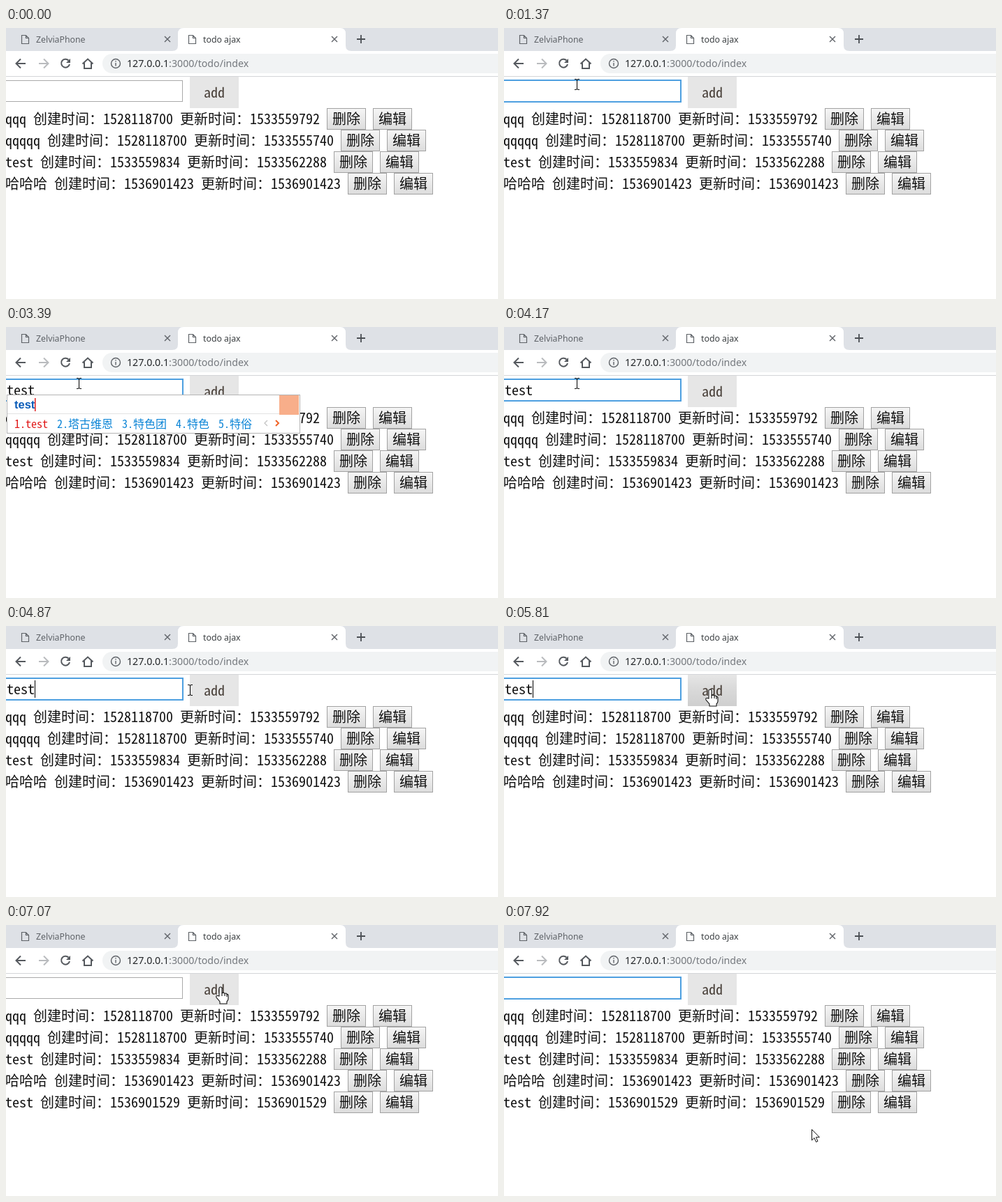
Write an HTML page with a canvas that moves like this. It is 704x389 px and loops after 8000 ms.

```html
<!DOCTYPE html>
<html lang="zh-CN">
<head>
<meta charset="utf-8">
<style>
html, body { margin: 0; width: 100%; height: 100%; overflow: hidden; background: #fff; }
canvas { display: block; }
</style>
</head>
<body>
<canvas id="stage" width="704" height="389"></canvas>
<script>
const c = document.getElementById('stage').getContext('2d');
const LOOP = 8000;
const MONO = '"Noto Sans Mono CJK SC", "Noto Sans CJK SC", monospace';
const UI = '"Noto Sans", "Open Sans", sans-serif';

const todos = [
  ['qqq', 1528118700, 1533559792],
  ['qqqqq', 1528118700, 1533555740],
  ['test', 1533559834, 1533562288],
  ['哈哈哈', 1536901423, 1536901423],
  ['test', 1536901529, 1536901529]
];
const typed = [[0, ''], [1830, 't'], [2310, 'te'], [2610, 'tes'], [2850, 'test'], [7070, '']];
const candidates = {
  t: '他 她 它 听 图',
  te: '特 忒 忑 慝 铽',
  tes: '特色 特俗 特赦 特设 特',
  test: 'test 塔古维恩 特色团 特色 特俗'
};
const caretOn = [[810, 1370], [1830, 3390], [3630, 4170], [4650, 5190], [5730, 6270]];
const pointer = [
  [0, null], [110, arrow, 548, 372], [190, arrow, 430, 290], [270, arrow, 310, 210],
  [350, arrow, 190, 140], [430, beam, 110, 100], [510, beam, 72, 88], [590, beam, 104, 88],
  [970, beam, 104, 84], [1050, beam, 104, 81], [4330, beam, 150, 79], [4410, beam, 215, 77],
  [4490, beam, 259, 77], [4730, beam, 260, 86], [4870, beam, 263, 92], [4970, hand, 285, 91],
  [5810, hand, 295, 92], [5890, hand, 306, 92], [5970, hand, 316, 92], [6050, hand, 322, 91],
  [6130, hand, 327, 91], [6210, hand, 320, 91], [6370, hand, 312, 90], [6450, hand, 307, 90],
  [7840, arrow, 400, 240], [7920, arrow, 440, 293]
];

const at = (list, t) => list.filter(k => k[0] <= t).pop();
const within = (t, a, b) => t >= a && t < b;

function rect(x, y, w, h, fill) {
  c.fillStyle = fill;
  c.fillRect(x, y, w, h);
}
function text(s, x, y, font, fill) {
  c.font = font;
  c.fillStyle = fill;
  c.fillText(s, x, y);
}
function path(d, stroke, width, fill, x = 0, y = 0) {
  const p = new Path2D(d);
  c.save();
  c.translate(x, y);
  if (fill) { c.fillStyle = fill; c.fill(p); }
  if (stroke) { c.strokeStyle = stroke; c.lineWidth = width; c.stroke(p); }
  c.restore();
}
function frame(x, y, w, h, stroke, width = 1) {
  c.strokeStyle = stroke;
  c.lineWidth = width;
  c.strokeRect(x, y, w, h);
}
function gradient(y, h, ...stops) {
  const g = c.createLinearGradient(0, y, 0, y + h);
  stops.forEach(([pos, color]) => g.addColorStop(pos, color));
  return g;
}

function arrow(x, y) {
  path('M.5 .5V16L4 12.6 6.6 18.5 9 17.4 6.5 11.7H11.4Z', '#111', 1, '#fff', x, y);
}
function beam(x, y) {
  path('M-3 -7.5H-1Q.5 -7.5 .5 -6V6Q.5 7.5 -1 7.5H-3M4 -7.5H2Q.5 -7.5 .5 -6M.5 6Q.5 7.5 2 7.5H4', '#000', 1, null, x, y);
}
function hand(x, y) {
  path('M-2 12V1Q-2 -1 0 -1T2 1V8Q4 6 6 8.5 8 7 9 9.5 11 9 11 11.5V16Q11 18 9 20V23H-1V20L-6 14Q-7 11 -4 11.5Z'
    + 'M2 8V12M6 9V12M9 10V13', '#111', 1.1, '#fff', x, y);
}

function tabLabel(x, label, color) {
  path('M.5 .5H6.5L10.5 4.5V12.5H.5ZM6.5 .5V4.5H10.5', '#5f6368', 1.2, null, x, 10);
  text(label, x + 21, 21, '12.3px ' + UI, color);
  path('M-4 -4L4 4M4 -4L-4 4', '#5f6368', 1.4, null, x + 209, 16);
}

function browser() {
  rect(0, 0, 704, 33, '#dee1e6');
  path('M238 33Q246 33 246 25V8Q246 0 254 0H478Q486 0 486 8V25Q486 33 494 33Z', null, 0, '#fff');
  tabLabel(22, 'ZelviaPhone', '#5f6368');
  tabLabel(261, 'todo ajax', '#3c4043');
  path('M502 16H514M508 10V22', '#4b4f54', 1.8);

  path('M28 51H15M21 44.5L14.5 51 21 57.5', '#55595e', 2);
  path('M47 51H60M54 44.5L60.5 51 54 57.5', '#b9bbbe', 2);
  path('M89.5 46.5A6 6 0 1 0 91 52', '#55595e', 2);
  path('M92 44V50H86Z', null, 0, '#55595e');
  path('M109.5 51.5L117 44.5 124.5 51.5M112 50V58H122V50', '#55595e', 2);
  path('M152 37H704V65H152A14 14 0 0 1 152 37Z', null, 0, '#f1f3f4');
  path('M150.5 51A6.5 6.5 0 1 1 163.5 51A6.5 6.5 0 1 1 150.5 51M157 50V54.5M157 47V48.6', '#5f6368', 1.4);
  const host = '127.0.0.1', font = '14.2px ' + UI;
  text(host, 173, 56, font, '#24272a');
  text(':3000/todo/index', 173 + c.measureText(host).width, 56, font, '#74787d');
  rect(0, 69, 704, 1, '#d3d5d8');
}

function addButton(t) {
  rect(263, 70, 70, 45, '#e6e6e6');
  if (within(t, 4970, 7070)) {
    rect(263, 70, 70, 45, gradient(70, 45, [0, 'rgba(0,0,0,0)'], [.4, 'rgba(0,0,0,.05)'], [1, 'rgba(0,0,0,.1)']));
  }
  if (within(t, 6830, 6910)) {
    frame(263.5, 70.5, 69, 44, 'rgba(0,0,0,.2)');
    frame(265, 72, 66, 41, 'rgba(0,0,0,.07)', 3);
  }
  text('add', 283, 100, '20px ' + MONO, '#483f38');
}

function input(t, value) {
  if (within(t, 810, 6830) || t >= 7840) frame(-5, 75, 258, 31, '#4d9fe0', 2);
  else frame(-5.5, 75.5, 258, 30, '#a9a9a9');
  text(value, 1, 98, '20px ' + MONO, '#111');
  if (caretOn.some(([a, b]) => within(t, a, b))) rect(1 + value.length * 10, 78, 1, 25, '#000');
}

function smallButton(label, x, y) {
  rect(x, y, 56, 31, gradient(y, 31, [0, '#f6f6f6'], [1, '#dcdcdc']));
  frame(x + .5, y + .5, 55, 30, '#a2a2a2');
  text(label, x + 8, y + 23, '20px ' + MONO, '#111');
}

function todoRow([name, created, updated], i) {
  const y = 115 + 31 * i, line = `${name} 创建时间：${created} 更新时间：${updated} `;
  text(line, -1, y + 23, '20px ' + MONO, '#111');
  const x = Math.round(c.measureText(line).width) - 1;
  smallButton('删除', x, y);
  smallButton('编辑', x + 66, y);
}

function imePopup(value) {
  const font = '16px ' + MONO;
  const words = candidates[value].split(' ').map((w, i) => `${i + 1}.${w}`);
  c.font = font;
  const end = words.reduce((x, w) => x + c.measureText(w).width + 13, 12) - 13;
  const right = Math.round(end) + 69;
  rect(1, 97, right - 1, 56, '#fff');
  frame(1.5, 97.5, right - 2, 55, '#b4b4b4');
  rect(2, 124, right - 3, 1, '#e2e2e2');
  text(value, 12, 117, 'bold 16.5px "Liberation Sans", Arial, sans-serif', '#0a5cb8');
  rect(Math.round(12 + c.measureText(value).width), 102, 1.5, 19, '#e02020');
  let x = 12;
  words.forEach((w, i) => {
    text(w, x, 145, font, i ? '#0a84d6' : '#e01818');
    x += c.measureText(w).width + 13;
  });
  path('M6 -4L2 0 6 4', '#c4c4c4', 1.3, null, end + 16, 138);
  path('M2 -4L6 0 2 4', '#f06428', 2, null, end + 32, 138);
  rect(right - 30, 98, 28, 28, '#f8ae8a');
}

function draw(now) {
  const t = now % LOOP, value = at(typed, t)[1];
  rect(0, 0, 704, 389, '#fff');
  browser();
  addButton(t);
  input(t, value);
  todos.slice(0, t < 7070 ? 4 : 5).forEach(todoRow);
  if (within(t, 1910, 3630)) imePopup(value);
  const [, shape, x, y] = at(pointer, t);
  if (shape) shape(x, y);
  requestAnimationFrame(draw);
}
requestAnimationFrame(draw);
</script>
</body>
</html>
```
